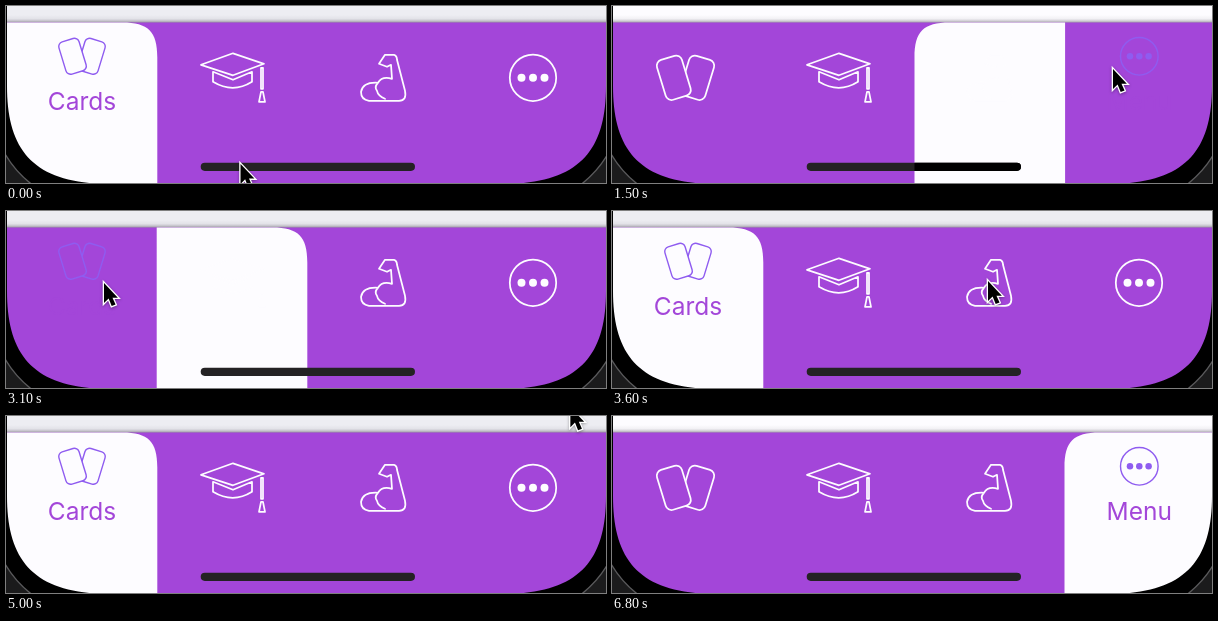
Animation, 600 px wide and 177 px high, one loop 6850 ms. Source, as an HTML page with a canvas:

```html
<!DOCTYPE html>
<html lang="en">
<head>
<meta charset="utf-8">
<title>Tab bar</title>
<style>
html, body { margin: 0; width: 100%; height: 100%; overflow: hidden; background: #000; }
canvas { display: block; width: 600px; height: 177px; }
</style>
</head>
<body>
<canvas id="stage"></canvas>
<script>
const W = 600, H = 177, TOP = 16.5, LOOP = 6850;
const SLIDE = 300, TRAVEL = 380, LEAD = 80;
const PURPLE = '#a346d9', WHITE = '#fdfcff', ACTIVE = '#8f5cf0';
const canvas = document.getElementById('stage');
const dpr = window.devicePixelRatio || 1;
canvas.width = W * dpr;
canvas.height = H * dpr;
const c = canvas.getContext('2d');

const path = d => new Path2D(d);
const mix = (a, b, k) => a + (b - a) * k;
const ease = k => {
  k = Math.max(0, Math.min(1, k));
  return k * k * (3 - 2 * k);
};
const edge = tab => tab > 0 ? 0.7 + 150.6 * tab : 0;

function pill(x, y, w, h, r) {
  const p = new Path2D();
  p.roundRect(x, y, w, h, r);
  return p;
}

function dot(x, r) {
  const p = new Path2D();
  p.arc(x, 0, r, 0, 7);
  return p;
}

function tilted(x, deg) {
  const p = new Path2D();
  p.addPath(pill(-13, -20.8, 26, 41.6, 6), new DOMMatrix().translate(x, 0).rotate(deg));
  return p;
}

const frontCard = tilted(-11.7, -17), backCard = tilted(11.7, 17);
const aroundFront = path('M-60-60H60V60H-60Z');
aroundFront.addPath(frontCard);
const cap = path('M-32-13L0-24.500L31-14L0-2.500Z M-20-6L0 2L19-6V4Q0 16-20 4Z' +
  'M28-10H30V11H28Z M28 14H30L32 24H26Z');
const arm = path('M-4-14L2-23H11Q14-22 14-18L22 13Q24 23 16 23H-14Q-22 22-22 14Q-20 4-5 5' +
  'Q-1-2 9 1L8-13L4-11Z M-5 5Q-9 9-6 13 M-6 13Q-5 18 2 21');
const arrow = path('M0 0V26L6 20L10 30L15 28L11 19H18Z');

// x and activeX are icon centres; aim is where the pointer taps
const tabs = [
  { label: 'Cards', x: 73.5, activeX: 76, aim: [97, 70], icon() {
    c.stroke(frontCard);
    c.clip(aroundFront, 'evenodd');
    c.stroke(backCard);
  } },
  { label: 'Study', x: 227, activeX: 227, aim: [227, 66], icon() { c.stroke(cap); } },
  { label: 'Results', x: 377, activeX: 377, aim: [375, 68], icon() { c.stroke(arm); } },
  { label: 'Menu', x: 527, activeX: 527.3, aim: [500, 61], icon() {
    c.stroke(dot(0, 23.2));
    for (const side of [-1, 0, 1]) c.fill(dot(11.5 * side, 4));
  } }
];

// [time, tab]: tapped with the pointer, then swiped without it
const taps = [[330, 1], [890, 2], [1490, 3], [2060, 2], [2520, 1], [3090, 0], [3630, 2], [4240, 0]];
const swipes = [1, 2, 3].map(tab => [4890 + 370 * tab, tab]);
const changes = [[-SLIDE, 0], ...taps, ...swipes];
const stops = [[0, 236, 190], ...taps.map(([t, tab]) => [t, ...tabs[tab].aim]), [5160, 622, -21]];

function drawTab({ label, x, activeX, icon }, active) {
  const s = active ? 0.81 : 1;
  c.save();
  c.translate(active ? activeX : x, active ? 50.3 : 71.8);
  c.scale(s, s);
  c.strokeStyle = c.fillStyle = active ? ACTIVE : WHITE;
  c.lineWidth = 1.75;
  c.lineJoin = c.lineCap = 'round';
  icon();
  c.restore();
  if (!active) return;
  c.fillStyle = PURPLE;
  c.font = '24.5px Inter, "Liberation Sans", sans-serif';
  c.textAlign = 'center';
  c.fillText(label, activeX, 104);
}

function highlight(x, right, roundLeft, roundRight) {
  const p = new Path2D(), k = 35, m = 9;
  const side = (a, dir, round) => {
    p.lineTo(a, H + 2);
    if (!round) return p.lineTo(a, TOP);
    p.lineTo(a, TOP + k);
    p.bezierCurveTo(a, TOP + m, a + m * dir, TOP, a + k * dir, TOP);
  };
  const mid = (x + right) / 2;
  p.moveTo(mid, H + 2);
  side(x, 1, roundLeft);
  p.lineTo(mid, TOP);
  p.lineTo(mid, H + 2);
  side(right, -1, roundRight);
  p.lineTo(mid, TOP);
  return p;
}

function drawCorner() {
  c.fillStyle = '#000';
  c.fill(path('M0 0H1V80C1 145 28 178 105 178H0Z'));
  const rim = 'M-2 146Q9 166 28 180';
  c.fillStyle = '#1b1b1c';
  c.fill(path(rim + 'H-2Z'));
  c.strokeStyle = '#5a5a5c';
  c.lineWidth = 1.3;
  c.stroke(path(rim));
}

function drawPointer(t) {
  const n = stops.findIndex(s => s[0] - LEAD > t);
  if (n < 1) return;
  const [, x0, y0] = stops[n - 1], [end, x1, y1] = stops[n];
  const k = ease(1 - (end - LEAD - t) / TRAVEL);
  c.save();
  c.translate(mix(x0, x1, k) + 1, mix(y0, y1, k) + 2);
  c.scale(0.77, 0.77);
  c.strokeStyle = '#fff';
  c.lineWidth = 3.4;
  c.shadowColor = 'rgba(0,0,0,.35)';
  c.shadowBlur = 3 * dpr;
  c.shadowOffsetY = dpr;
  c.stroke(arrow);
  c.shadowColor = 'transparent';
  c.fillStyle = '#000';
  c.fill(arrow);
  c.restore();
}

function drawTop(tab) {
  c.fillStyle = tab ? WHITE : '#ededf2';
  c.fillRect(0, 0, W, TOP + 1);
  const shade = c.createLinearGradient(0, 9, 0, TOP);
  for (const k of [0, 0.5, 0.8, 1]) shade.addColorStop(k, `rgba(40,30,50,${0.42 * k ** 3})`);
  c.fillStyle = shade;
  c.fillRect(0, 9, W, TOP - 8);
}

function draw(t) {
  let n = changes.length - 1;
  while (changes[n][0] > t) n--;
  const [start, tab] = changes[n], from = n ? changes[n - 1][1] : tab;
  const k = ease((t - start) / SLIDE);
  const box = highlight(mix(edge(from), edge(tab), k), mix(edge(from + 1), edge(tab + 1), k),
    tab > 0, tab < 3);

  c.setTransform(dpr, 0, 0, dpr, 0, 0);
  drawTop(tab);
  c.fillStyle = PURPLE;
  c.fillRect(0, TOP, W, H - TOP);
  c.fillStyle = WHITE;
  c.fill(box);
  tabs.forEach((item, i) => drawTab(item, i === tab));

  const bar = pill(194.7, 156.7, 214.3, 8.2, 4.1);
  c.fillStyle = '#242224';
  c.fill(bar);
  if (tab) {
    c.save();
    c.clip(box);
    c.fillStyle = '#000';
    c.fill(bar);
    c.restore();
  }

  drawCorner();
  c.save();
  c.translate(W + 1, 0);
  c.scale(-1, 1);
  drawCorner();
  c.restore();
  drawPointer(t);
}

const begin = performance.now();
function tick() {
  draw((performance.now() - begin) % LOOP);
  requestAnimationFrame(tick);
}
tick();
</script>
</body>
</html>
```
